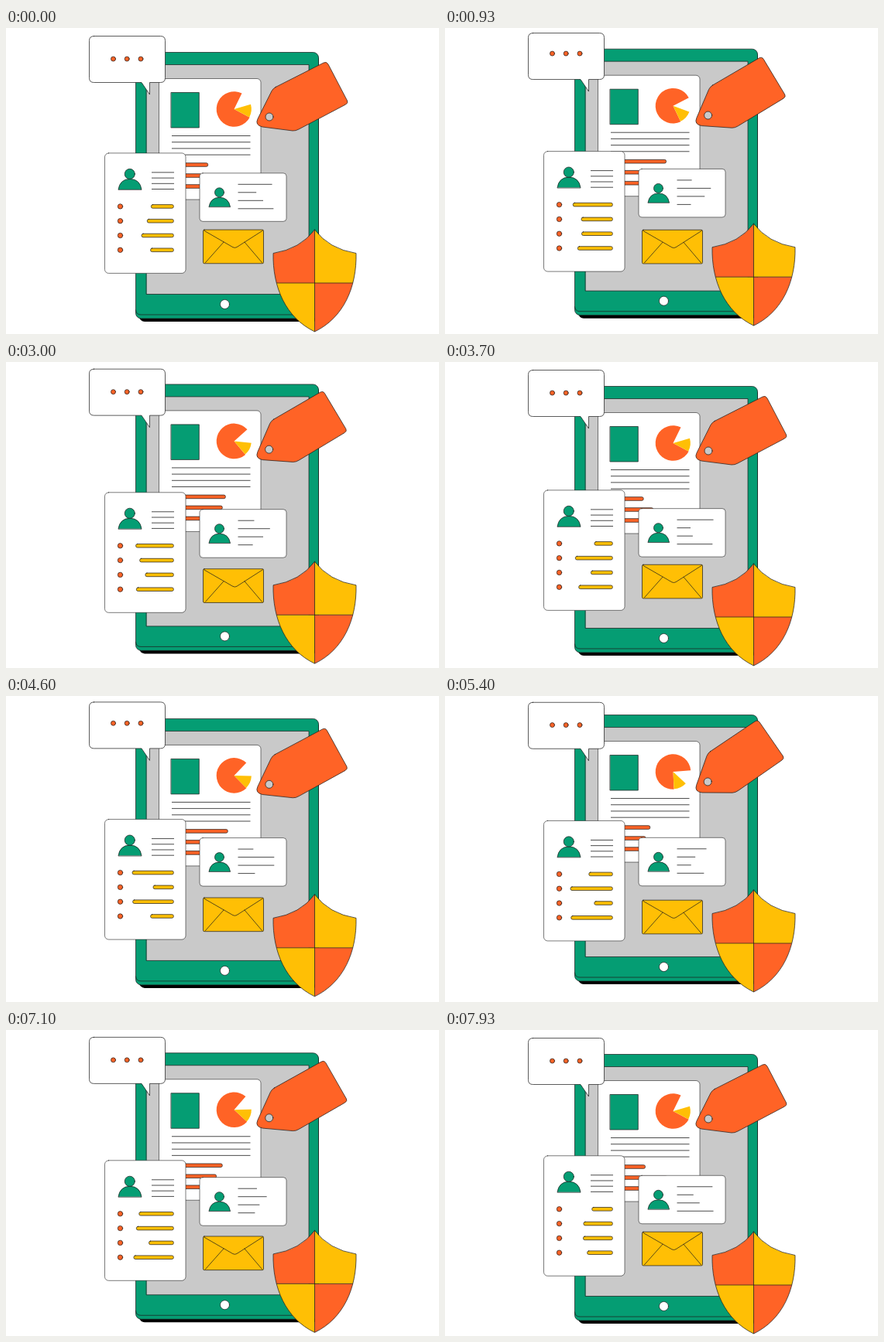
Recreate the animation shown at these times as an HTML page. Size 559 by 396 pixels, loop 8010 ms.

```html
<!DOCTYPE html>
<html lang="en">
<head>
<meta charset="utf-8">
<title>Tablet with floating cards</title>
<style>
  html, body { margin: 0; width: 100%; height: 100%; overflow: hidden; background: #fff; }
  svg { display: block; width: 559px; height: 396px; }
  .ink { stroke: #1c1c1c; stroke-opacity: .8; stroke-width: .9; stroke-linejoin: round; stroke-linecap: round; }
  .soft { stroke-opacity: .65; }
  .line { stroke: #4a4a4a; stroke-width: 1; fill: none; }
  .white { fill: #fff; }
  .green { fill: #059d73; }
  .orange { fill: #ff6326; }
  .yellow { fill: #ffbf05; }
  .grey { fill: #c9c9c9; }
  .none { fill: none; }
</style>
</head>
<body>
<svg viewBox="0 0 559 396">
  <defs>
    <path id="shieldShape" d="M398.5 261Q380 286 345 291.5C344 335 361 375 398.5 393C436 375 453 335 452 291.5Q417 286 398.5 261Z"/>
    <clipPath id="shieldClip"><use href="#shieldShape"/></clipPath>
  </defs>

  <g id="tablet">
    <rect x="172" y="33" width="231.8" height="347" rx="7"/>
    <rect class="green ink" x="167.5" y="31.5" width="236" height="344.5" rx="7"/>
    <path class="none ink" d="M167.5 365Q168 371 174 371H397Q403 371 403.5 365"/>
    <rect class="grey ink" x="181.5" y="47.5" width="209.5" height="297"/>
    <circle class="white ink" cx="282.5" cy="357.5" r="6"/>
    <rect class="white ink soft" x="197.5" y="65.5" width="131.5" height="156.5" rx="5"/>
    <rect class="green ink" x="213.3" y="83.5" width="36" height="45.5"/>
    <g id="docLines"></g>
    <g id="docBars"></g>
    <g id="pie">
      <path id="pieMain" class="orange"/>
      <path id="pieSlice" class="yellow"/>
    </g>
  </g>

  <g id="bubble">
    <path class="white ink" d="M113.5 10.5H199.5Q205.5 10.5 205.5 16.5V64.5Q205.5 70.5 199.5 70.5H185.5V86L175 70.5H113.5Q107.5 70.5 107.5 64.5V16.5Q107.5 10.5 113.5 10.5Z"/>
    <g id="dots" class="orange ink">
      <circle cx="138.5" cy="40" r="3"/><circle cx="156.2" cy="40" r="3"/><circle cx="174" cy="40" r="3"/>
    </g>
  </g>

  <g id="list">
    <rect class="white ink soft" x="127.5" y="161.5" width="104.5" height="155.5" rx="5"/>
    <g class="green ink">
      <path d="M145 208.5Q147 195 160 195T175 208.5Z"/>
      <circle cx="159.8" cy="188.5" r="6.6"/>
    </g>
    <g id="listLines"></g>
    <g id="listBars"></g>
  </g>

  <g id="card">
    <rect class="white ink soft" x="250" y="187.5" width="112" height="62.5" rx="4"/>
    <g class="green ink">
      <path d="M262 231Q264 219 275.7 219T289.5 231Z"/>
      <circle cx="275.5" cy="212.5" r="6"/>
    </g>
    <g id="cardLines"></g>
  </g>

  <g id="mail">
    <rect class="yellow ink" x="254.5" y="261" width="78" height="43.7" rx="1.5"/>
    <path class="none ink" d="M255.5 262L293 283.7Q295.5 285 298 283.5L331.5 262M257.5 303.5L281 277M330.5 303.5L308 277"/>
  </g>

  <g id="tag">
    <path class="orange ink" d="M348 76.5L410 45Q414 43 416 47L440.5 94Q442 97 438.5 99L378 131Q374 133.3 370 133L331 128Q321 125.5 325 117.5L343 81.5Q345 78 348 76.5Z"/>
    <circle class="grey ink" cx="340" cy="115" r="5"/>
  </g>

  <g id="shield">
    <g clip-path="url(#shieldClip)">
      <rect class="orange" x="340" y="255" width="58.5" height="75"/>
      <rect class="yellow" x="398.5" y="255" width="58.5" height="75"/>
      <rect class="yellow" x="340" y="330" width="58.5" height="70"/>
      <rect class="orange" x="398.5" y="330" width="58.5" height="70"/>
      <path class="ink" d="M398.5 255V400M340 330H457"/>
    </g>
    <use href="#shieldShape" class="none ink"/>
  </g>
</svg>

<script>
const LOOP = 8010, CYCLE = 4000, SWAY = 2000;
const $ = id => document.getElementById(id);

function ease(t, from, to) {
  const u = Math.min(1, Math.max(0, (t - from) / (to - from)));
  return (1 - Math.cos(Math.PI * u)) / 2;
}

// Rises from a to b, holds until c, falls back by d; repeats every cycle
function bump(t, a, b, c, d) {
  const s = a + (t - a + CYCLE) % CYCLE;
  return ease(s, a, b) - ease(s, c, d);
}

const pulse = (t, a, peak, b) => bump(t, a, peak, peak, b);
const sway = (t, mid, amp, peak) => mid + amp * Math.cos(2 * Math.PI * (t - peak) / SWAY);

// Vertical offsets
const lift = {
  tablet: t => -7.5 * bump(t, 0, 1700, 2250, 3500),
  shield: t => -10 * bump(t, 0, 1350, 2250, 3400),
  mail: t => 9 * bump(t, 750, 2350, 2450, 4100),
  list: t => -1.9 + 9.2 * bump(t, 1000, 2350, 3300, 4350),
  card: t => -5.2 + 8.4 * bump(t, 1050, 2600, 3300, 5050),
  bubble: t => -4 * pulse(t, 0, 1000, 2150) + 2.6 * pulse(t, 1000, 2150, 2850) - 1.5 * pulse(t, 2150, 2850, 3600),
  dots: t => -3 * pulse(t, 0, 930, 1500)
};

// Times at which each swaying line reaches furthest right
const listPeaks = [1720, 400, 1450, 300];
const cardPeaks = [1780, 700, 500, 1850];
const docPeaks = [750, 420, 750];

function add(parent, tag, attrs) {
  const el = document.createElementNS("http://www.w3.org/2000/svg", tag);
  for (const k in attrs) el.setAttribute(k, attrs[k]);
  return $(parent).appendChild(el);
}

const rule = (parent, x1, x2, y) => add(parent, "line", { class: "line", x1, x2, y1: y, y2: y });
const bar = (parent, fill, x, y) =>
  add(parent, "rect", { class: fill + " ink", x, y: y - 2.3, height: 4.6, rx: 2 });

for (let i = 0; i < 4; i++) {
  rule("docLines", 214, 315.5, 139.5 + 8.2 * i);
  rule("listLines", 188, 217, 186.5 + 7.2 * i);
}
const cardLines = cardPeaks.map((_, i) => rule("cardLines", 299.5, 320, 202 + 10.5 * i));
const docBars = docPeaks.map((_, i) => bar("docBars", "orange", 214, 177 + 14 * i));
const listBars = listPeaks.map((_, i) => {
  const y = 230.5 + 18.8 * i;
  add("listBars", "circle", { class: "orange ink", cx: 147.5, cy: y, r: 3.2 });
  return bar("listBars", "yellow", 180, y);
});

function sector(from, to, r) {
  const point = deg => {
    const a = deg * Math.PI / 180;
    return `${(r * Math.cos(a)).toFixed(2)} ${(r * Math.sin(a)).toFixed(2)}`;
  };
  return `M0 0L${point(from)}A${r} ${r} 0 ${to - from > 180 ? 1 : 0} 1 ${point(to)}Z`;
}
$("pieMain").setAttribute("d", sector(28, 296, 22.8));
$("pieSlice").setAttribute("d", sector(-16, 28, 22.3));

const place = (id, transform) => $(id).setAttribute("transform", transform);

function draw(t) {
  for (const id in lift) place(id, `translate(0 ${lift[id](t).toFixed(2)})`);

  place("pie", `translate(294.5 105) rotate(${64 * bump(t, 0, 1700, 2250, 3500)})`);
  const k = bump(t, 200, 1900, 2300, 3500);
  place("tag", `translate(${-k} ${-5 * k}) rotate(${-8.8 * k} 340 115)`);

  cardLines.forEach((el, i) => el.setAttribute("x2", sway(t, 332, 15, cardPeaks[i])));
  docBars.forEach((el, i) => {
    const odd = i % 2;
    el.setAttribute("width", sway(t, 272 + 14 * odd, 16 + 11 * odd, docPeaks[i]) - 214);
  });
  listBars.forEach((el, i) => {
    const x = sway(t, 177.5, 15.5, listPeaks[i]);
    el.setAttribute("x", x);
    el.setAttribute("width", 216.3 - x);
  });
}

// The picture changes at 0 and 30 ms of every 100 ms
function step(ms) {
  const t = Math.min(ms % LOOP, 7999);
  return Math.floor(t / 100) * 100 + (t % 100 >= 30 ? 30 : 0);
}

const start = performance.now();
function tick() {
  draw(step(performance.now() - start) % CYCLE);
  requestAnimationFrame(tick);
}
tick();
</script>
</body>
</html>
```
